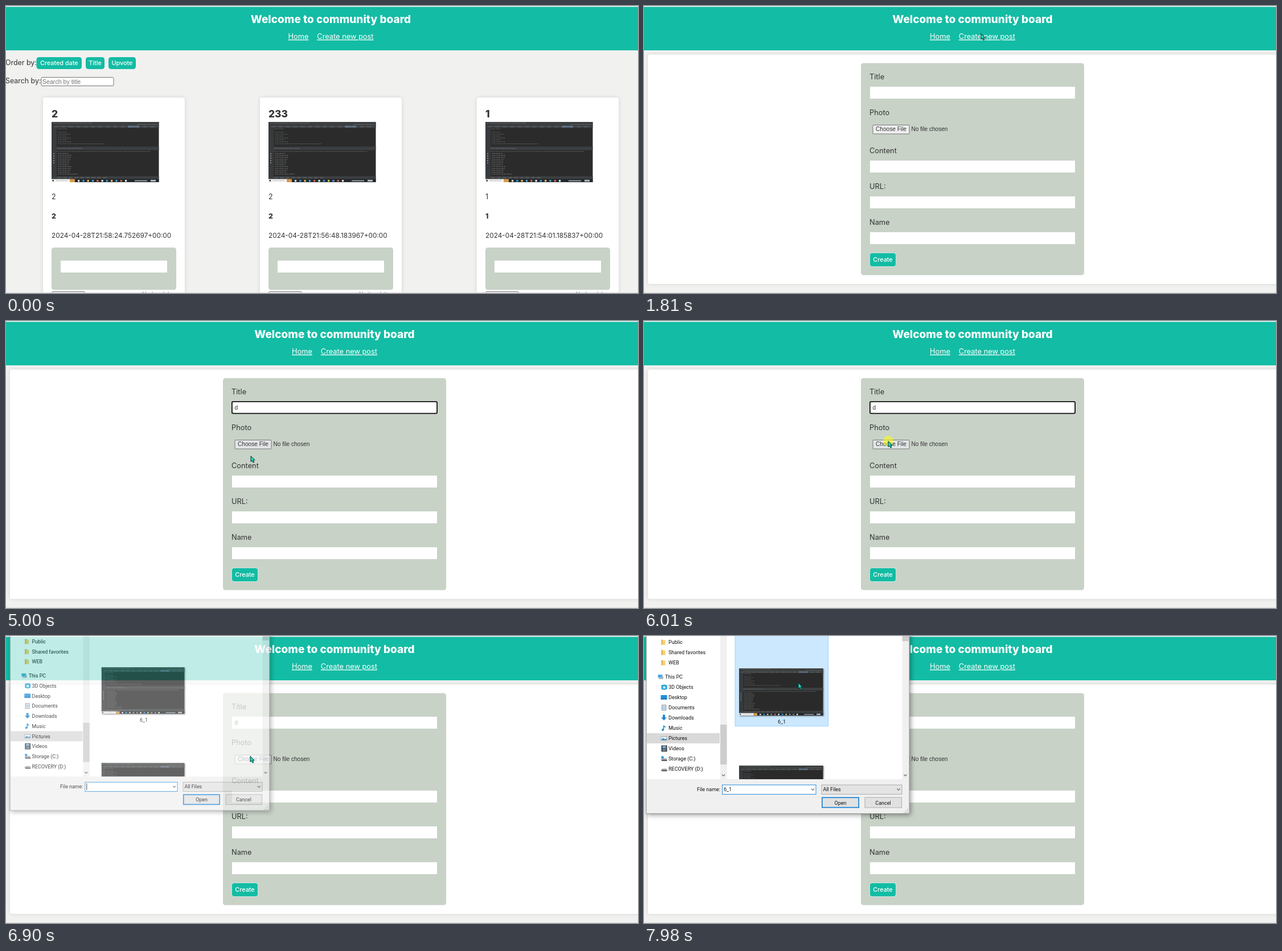
An HTML page that plays this animation: 1110 by 505 pixels, repeating every 8000 ms.

```html
<!DOCTYPE html>
<html lang="en">
<head>
<meta charset="utf-8">
<title>Community board</title>
<style>
  html, body { margin: 0; width: 100%; height: 100%; overflow: hidden; background: #f1f1f0; }
  svg { display: block; width: 1110px; height: 505px; }
  text { font: 400 12.8px Inter, "Open Sans", sans-serif; fill: #333; white-space: pre; }
  .heading { font-size: 19px; font-weight: 800; fill: #fff; text-anchor: middle; }
  .link { fill: #fff; text-decoration: underline; }
  .button { font-size: 10.8px; font-weight: 500; fill: #fff; text-anchor: middle; }
  .label { font-size: 12.4px; }
  .name { font-size: 17.4px; font-weight: 800; }
  .bold { font-size: 12.4px; font-weight: 800; }
  .stamp { font-size: 11.8px; }
  .field { font: 10.1px "Liberation Sans", Arial, sans-serif; }
  .dialog { font: 9px Roboto, "Noto Sans", sans-serif; fill: #111; }
  .mid { text-anchor: middle; }
  .end { text-anchor: end; }
</style>
</head>
<body>
<svg id="stage" viewBox="0 0 1110 505"></svg>
<script>
const TEAL = '#13bca4', SAGE = '#c8d2c7', LOOP = 8000;

const text = (x, y, str, cls) => `<text x="${x}" y="${y}" class="${cls}">${str}</text>`;
const rect = (x, y, w, h, fill, extra = '') =>
  `<rect x="${x}" y="${y}" width="${w}" height="${h}" fill="${fill}" ${extra}/>`;
const path = (d, extra) => `<path d="${d}" ${extra}/>`;
const frame = (x, y, w, h, fill, stroke, width = 1, r = 0) =>
  rect(x + width / 2, y + width / 2, w - width, h - width, fill,
    `stroke="${stroke}" stroke-width="${width}" rx="${r}"`);
const group = (id, body, extra = '') => `<g id="${id}" ${extra}>${body}</g>`;
const button = (x, y, w, h, str) =>
  rect(x, y, w, h, TEAL, 'rx="4.5"') + text(x + w / 2, y + h / 2 + 3.8, str, 'button');

// A dark code editor seen from far away, 188 by 106
function editor() {
  const dashes = (x, y, w, color = '#85898c', dash = '2 .8 3 1 1.5 .7') =>
    path(`M${x} ${y}h${w}`, `stroke="${color}" stroke-width=".8" stroke-dasharray="${dash}" opacity=".75"`);
  let s = rect(0, 0, 188.5, 106, '#2b2b2b') + rect(0, 0, 188.5, 10.5, '#3c3f41') +
    rect(0, 0, 9, 100, '#383b3d') + rect(9, 43.5, 179.5, 6, '#3c3f41') +
    rect(0, 95.5, 188.5, 5, '#3c3f41') + rect(134, 6.5, 20, 3.5, '#53667a');
  s += dashes(2, 2, 70) + dashes(150, 4.5, 36) + dashes(4, 8.3, 180, '#8d9296', '8 2 1 2') +
    dashes(10, 12.3, 18) + dashes(10, 46.5, 45) + dashes(10, 98, 88, '#8d9296', '7 3');
  for (let i = 0; i < 7; i++) s += dashes(11, 18 + i * 3.4, i === 6 ? 82 : 15 + (i * 7) % 13);
  s += dashes(9, 52, 165);
  for (let i = 0; i < 12; i++) s += dashes(11, 55.5 + i * 3.3, i === 11 ? 36 : 19 + (i * 5) % 6, '#a2a5a7');
  for (let i = 0; i < 5; i++) s += rect(3, 55 + i * 4, 2, 2, '#7c8184');
  s += rect(0, 100.5, 188.5, 5.5, '#24292d') + rect(0, 100.5, 33, 5.5, '#f4f4f4') +
    rect(1.5, 102, 2.5, 2.5, '#333') + dashes(8, 103.3, 20, '#777') + rect(32, 100.5, 9, 5.5, '#d89a4e');
  const hues = ['#dfe6ea', '#3b9bd8', '#e9c15a', '#4aa6d9', '#d46a45'];
  for (let i = 0; i < 11; i++) s += rect(46 + i * 8.3, 102, 3.2, 3.2, hues[i % 5]);
  return s + rect(146, 102.5, 22, 2, '#969b9e') + rect(174, 101.8, 9, 3, '#b8bcbf');
}

const header = cx =>
  rect(0, 0, 1110, 1.5, '#fafafa') + rect(0, 1.5, 1110, 76.5, TEAL) +
  text(cx, 30, 'Welcome to community board', 'heading') +
  text(cx - 75, 58, 'Home', 'link') + text(cx - 24.2, 58, 'Create new post', 'link');

const footer = rect(0, 504, 1110, 1, '#dfdfdf');

function card(x, name, body, stamp) {
  return `<g transform="translate(${x} 0)">` +
    rect(0, 161, 249, 360, '#fff', 'rx="4" filter="url(#soft)"') +
    text(15, 196, name, 'name') + '<use href="#editor" x="15" y="204"/>' +
    text(15, 340, body, 'label') + text(15, 374, body, 'bold') + text(15, 408, stamp, 'stamp') +
    rect(15, 425, 219, 74.5, SAGE, 'rx="4.5"') + rect(31, 448, 187, 21, '#fff') +
    frame(15, 502, 59, 16, '#efefef', '#767676', 1, 2) +
    path('M174 503.5h3m2 0h2m10 0h2m18 0h2m6 0h2', 'stroke="#6fa8a4"') + '</g>';
}

const board = header(570.5) +
  text(-1, 104, 'Order by:', 'label') + text(-1, 136, 'Search by:', 'label') +
  button(53.5, 90, 79.5, 21, 'Created date') + button(140, 90, 33, 21, 'Title') +
  button(180, 90, 48, 21, 'Upvote') +
  frame(61.5, 125, 128, 16, '#fff', '#767676', 1, 2) +
  '<text x="64" y="136.5" class="field" style="font-size:10.6px;fill:#757575">Search by title</text>' +
  card(65, '2', '2', '2024-04-28T21:58:24.752697+00:00') +
  card(446, '233', '2', '2024-04-28T21:56:48.183967+00:00') +
  card(827, '1', '1', '2024-04-28T21:54:01.185837+00:00') + footer;

const input = y => rect(397, y, 360, 21, '#fff');
const form = rect(0, 0, 1110, 505, '#f1f1f0') + header(577) +
  rect(7, 85.5, 1140, 403.5, '#fff', 'rx="4" filter="url(#soft)"') +
  rect(381, 100.5, 392, 373, SAGE, 'rx="4.5"') +
  [['Title', 129], ['Photo', 192], ['Content', 258.5], ['URL:', 322], ['Name', 384.5]]
    .map(([str, y]) => text(396, y, str, '')).join('') +
  [142, 272, 335, 398].map(input).join('') +
  frame(396, 141, 362, 22.5, 'none', '#101010', 1.8, 2).replace('<rect', '<rect id="ring"') +
  group('typed', text(401.5, 156, 'd', 'field')) +
  rect(402, 146, 1, 12, '#000', 'id="caret"') +
  frame(401.5, 209, 65, 16.5, '#efefef', '#767676', 1, 1).replace('<rect', '<rect id="choose"') +
  text(434, 220.3, 'Choose File', 'field mid') + text(469.5, 220.3, 'No file chosen', 'field') +
  frame(396, 434, 47, 25, TEAL, '#e4f3ee', .8, 4.5) + text(419.5, 450, 'Create', 'button') + footer;

const folder = '<path d="M1 1h3l1 1h3v8h-7z" fill="#f7d074"/><path d="M1 1h2v9h-2z" fill="#e3b04b"/>';
const drive = '<path d="M0 7l3-2h7l1 2v2h-9z" fill="#9a9da0"/><path d="M1 8h10v1.5h-9z" fill="#444"/>';
const icons = {
  pc: rect(1, 2, 8, 5.5, '#4ea7dd') + rect(3, 8, 7, 1.5, '#8b98a2') + rect(7, 5, 3.5, 4, '#a9b5bd'),
  cube: path('M1 2l5-1 5 1v7l-5 1.5-5-1.5z', 'fill="#27a3d6"') + path('M4 4h4v4h-4z', 'fill="#c8effb"'),
  desk: rect(0, 1.5, 11, 7.5, '#1e90db') + rect(0, 7.5, 11, 1.5, '#0c6bab'),
  doc: frame(1.5, .5, 8, 10, '#fff', '#7d8a94') + path('M3 3.5h5M3 5.5h5M3 7.5h5', 'stroke="#4c94c8" stroke-width=".9"'),
  down: path('M3.5 0h4v5h3l-5 5-5-5h3z', 'fill="#2384d0"'),
  note: path('M5 8V1q1 2 3.5 3', 'fill="none" stroke="#1b8ed8" stroke-width="1.6"') + '<circle cx="3.6" cy="8.4" r="2" fill="#1b8ed8"/>',
  image: frame(0, 2, 11, 7.5, '#e8f4fb', '#9aa9b3') + path('M1 8l3-3 3 2 3-1v2.5h-9z', 'fill="#3a86b8"'),
  film: rect(1, 0, 10, 11, '#3a3d42') + rect(3, 1, 6, 4, '#7fb0d2') + rect(3, 6, 6, 4, '#60839e'),
  system: drive + rect(1, 1, 4, 4, '#1e90db'),
  drive
};

function tree() {
  const row = (icon, x, y, str) =>
    `<g transform="translate(${x - 13.5} ${y - 5.5})">${icon}</g>` + text(x, y + 3.3, str, 'dialog');
  const places = [['cube', '3D Objects'], ['desk', 'Desktop'], ['doc', 'Documents'], ['down', 'Downloads'],
    ['note', 'Music'], ['image', 'Pictures'], ['film', 'Videos'], ['system', 'Storage (C:)'], ['drive', 'RECOVERY (D:)']];
  return rect(5, 171, 128, 18, '#d9d9d9') +
    ['Public', 'Shared favorites', 'WEB'].map((s, i) => row(folder, 43, 11 + i * 18, s)).join('') +
    row(icons.pc, 37, 71.5, 'This PC') +
    places.map(([k, s], i) => row(icons[k], 43, 90 + i * 18, s)).join('');
}

const chevron = (x, y, w = 2.6) =>
  path(`M${x - w} ${y - w / 2}l${w} ${w}l${w} ${-w}`, 'fill="none" stroke="#555" stroke-width="1.1"');
const thumb = y => `<use href="#editor" transform="translate(167 ${y}) scale(.782)" filter="url(#lift)"/>`;
const grip = [[462, 304], [462, 307], [462, 310], [459, 307], [459, 310], [456, 310]]
  .map(([x, y]) => rect(x, y, 1.5, 1.5, '#b0b0b0')).join('');

const dialog = rect(4, -220, 462, 532.5, '#f0f0f0', 'stroke="#8a8d8d" stroke-width=".9" filter="url(#deep)"') +
  rect(5, -20, 460, 272, '#fff') + tree() +
  rect(134, -20, 11.5, 272, '#f0f0f0') + rect(134, 156, 11.5, 70, '#cdcdcd') + chevron(139.5, 245) +
  rect(453.5, -20, 11.5, 272, '#f0f0f0') + rect(453.5, -20, 11.5, 29, '#cdcdcd') + chevron(459, 245) +
  group('tile', frame(159.5, -20, 164.5, 179, '#cce8ff', '#99d1ff')) +
  `<g clip-path="url(#files)">${thumb(57)}${thumb(228)}</g>` + text(242, 154, '6_1', 'dialog mid') +
  text(134, 273.3, 'File name:', 'dialog end') +
  frame(137, 261.5, 165.5, 17.5, '#fff', '#2a8ddd') + chevron(296.5, 270) +
  group('picked', text(140, 273.3, '6_1', 'dialog')) + rect(140, 264, 1, 12, '#111', 'id="nameCaret"') +
  frame(311.5, 261.5, 142, 17.5, '#e3e3e3', '#adadad') + text(314.5, 273.3, 'All Files', 'dialog') + chevron(447, 270) +
  frame(312, 283.5, 66, 19, '#e1e1e1', '#0f7fd6', 1.6) + text(345, 296.5, 'Open', 'dialog mid') +
  frame(387.5, 283.5, 65.5, 19, '#e1e1e1', '#adadad') + text(420, 296.5, 'Cancel', 'dialog mid') + grip;

const outline = 'fill="#16e0c0" stroke="#0b2b28" stroke-width="1" stroke-linejoin="round"';
const pointers = {
  arrow: path('M0 .5v10l2.2-1.9 1.9 3.6 1.7-.8-1.7-3.5 2.9-.2z', outline),
  hand: path('M-1 1q1-1.2 2 0v4l4 .9q1.3.6 1 2.5l-.8 3v1.4h-5.2v-1.2l-3-3.6q.3-1.4 2-.2z', outline),
  beam: path('M-3 -5.5h2.2l.8.7.8-.7h2.2M-3 5.5h2.2l.8-.7.8.7h2.2M0 -5v10', 'fill="none" stroke="#2f4a1e" stroke-width="1.5"')
};

const shadow = (id, dx, dy, blur, opacity) =>
  `<filter id="${id}" x="-20%" y="-20%" width="140%" height="140%">
    <feDropShadow dx="${dx}" dy="${dy}" stdDeviation="${blur}" flood-opacity="${opacity}"/></filter>`;

document.getElementById('stage').innerHTML =
  `<defs>${shadow('soft', 0, 0, 3, .13)}${shadow('lift', 1.5, 1.5, 1.2, .45)}${shadow('deep', 2, 2, 4.5, .4)}
    <clipPath id="files"><rect x="146" y="0" width="307" height="252"/></clipPath>
    ${group('editor', editor())}</defs>` +
  group('board', board) + group('form', form) + group('dialog', dialog) +
  '<circle id="click" r="9" fill="#ffff00" fill-opacity=".55"/>' +
  group('pointer', Object.entries(pointers).map(([k, d]) => group(k, d)).join(''));

const el = id => document.getElementById(id);
const show = (id, on) => el(id).setAttribute('display', on ? 'inline' : 'none');
const within = (t, a, b) => t >= a && t < b;

// start ms, end ms, number of steps, destination
const moves = [
  [250, 670, 7, 606, 92], [930, 1200, 5, 592, 48], [2270, 2860, 10, 511, 151],
  [4860, 5000, 3, 430, 237], [5070, 5140, 2, 440, 243], [5210, 5410, 4, 431, 216],
  [5550, 5740, 4, 429, 211], [7030, 7230, 4, 311, 110], [7430, 7570, 3, 271, 82]
];
const clicks = [[1610, 1670], [3070, 3210], [6010, 6210], [7840, 7980]];

function pointerAt(t) {
  let x = 1006, y = 452;
  for (const [start, end, steps, toX, toY] of moves) {
    if (t < start) break;
    const done = Math.floor((t - start) / (end - start) * (steps - 1) + 1e-6) + 1;
    const p = Math.min(1, done / steps);
    x += (toX - x) * p;
    y += (toY - y) * p;
  }
  return [x, y];
}

function pointerKind(t, x, y) {
  if (t > 2000 && t < 6000 && y > 141 && y < 164 && x > 396) return 'beam';
  const overLink = t < 3000 && y < 62 && x > 552;
  return overLink && !within(t, 1810, 2070) ? 'hand' : 'arrow';
}

function draw(t) {
  show('board', t < 1810);
  show('form', t >= 1810);

  const focused = within(t, 3140, 6070);
  show('ring', focused);
  show('typed', t >= 4130);
  el('choose').setAttribute('fill', t < 3140 ? '#efefef' : '#e2e5e6');
  el('caret').setAttribute('x', t < 4130 ? 402 : 407);
  show('caret', focused && (within(t, 3140, 3600) || within(t, 4130, 4660) || within(t, 5200, 5720)));

  const open = Math.min(1, Math.max(0, (t - 6723) / 244));
  const scale = .95 + .05 * open;
  show('dialog', open > 0);
  el('dialog').setAttribute('opacity', open);
  el('dialog').setAttribute('transform', `translate(234.5 -91) scale(${scale}) translate(-234.5 91)`);
  show('tile', t >= 7840);
  show('picked', t >= 7840);
  show('nameCaret', within(t, 6900, 7500));

  const [x, y] = pointerAt(t);
  const kind = pointerKind(t, x, y);
  show('pointer', t >= 250);
  el('pointer').setAttribute('transform', `translate(${x} ${y})`);
  for (const k in pointers) show(k, k === kind);
  show('click', clicks.some(([a, b]) => within(t, a, b)));
  el('click').setAttribute('cx', x);
  el('click').setAttribute('cy', y);
}

const began = performance.now();
function tick() {
  draw((performance.now() - began) % LOOP);
  requestAnimationFrame(tick);
}
tick();
</script>
</body>
</html>
```
